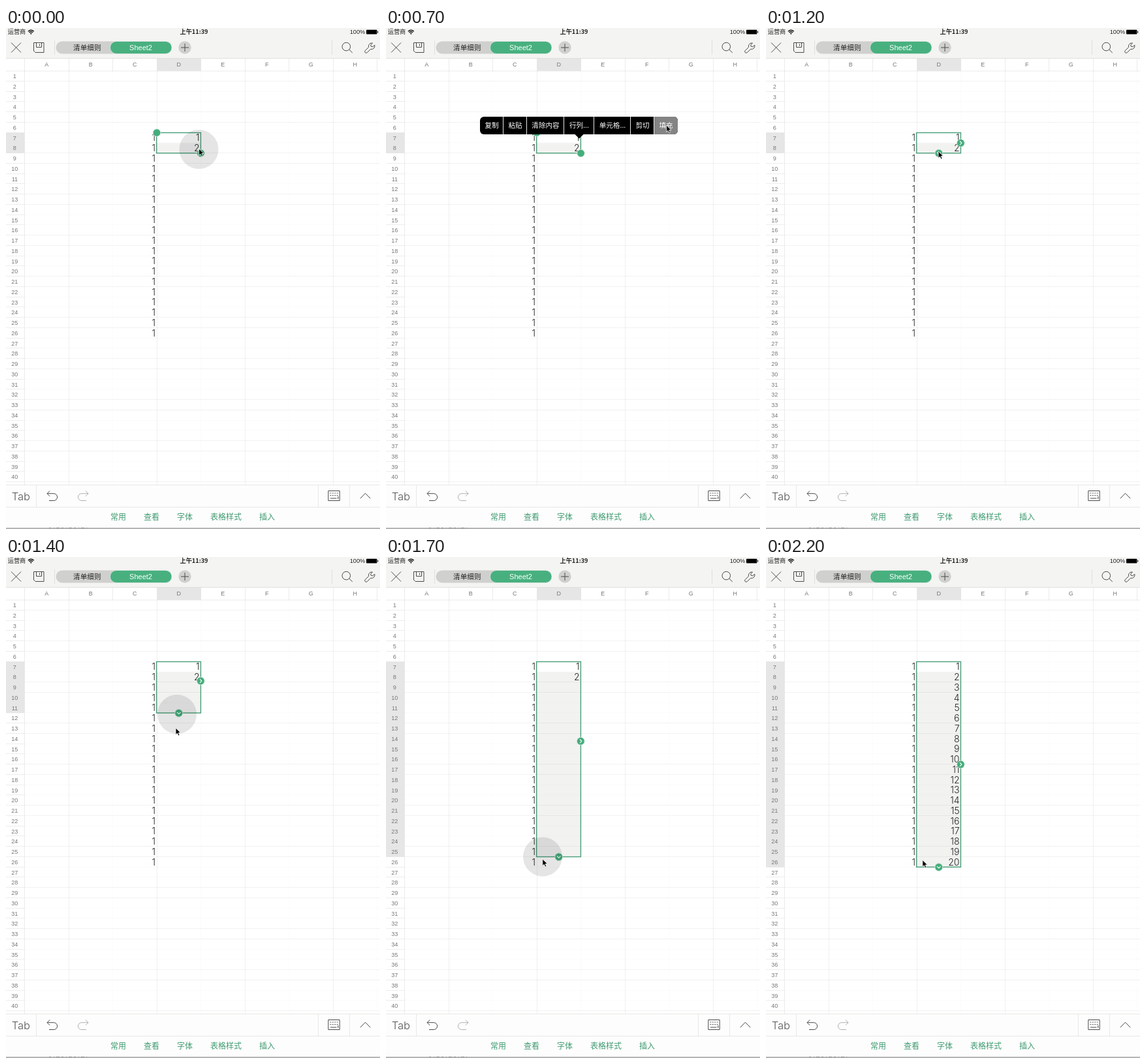
An HTML page that plays this animation: 573 by 768 pixels, repeating every 2400 ms.

```html
<!DOCTYPE html>
<html lang="zh-CN">
<head>
<meta charset="utf-8">
<title>表格填充</title>
<style>
  html, body { margin: 0; width: 100%; height: 100%; overflow: hidden; background: #fff; }
  svg { display: block; width: 573px; height: 768px; }
  text { font-family: "Noto Sans CJK SC", "Noto Sans CJK", sans-serif; text-anchor: middle; }
  .latin text, text.latin { font-family: "Liberation Sans", Arial, sans-serif; }
  .head text { font-size: 9px; fill: #777; }
  .num text { font: 300 14px Inter, Roboto, sans-serif; fill: #222; text-anchor: end; }
  .icon { fill: none; stroke: #4a4a4a; stroke-width: 1; }
  .rule { stroke: #dfdfdd; stroke-width: 1; }
  .tabs text { font-size: 12px; fill: #3f9a70; }
  .menu text { font-size: 10.6px; fill: #fff; }
  .knob { fill: #44ad7b; stroke: #dcebe3; stroke-width: .8; }
  .tip { fill: none; stroke: #fff; stroke-width: 1.1; }
</style>
</head>
<body>
<svg viewBox="0 0 573 768" xmlns="http://www.w3.org/2000/svg">
  <rect width="573" height="768" fill="#fff"/>

  <!-- sheet -->
  <rect id="fill" x="231" width="67.5" fill="#f2f2f1"/>
  <g id="grid"></g>
  <rect id="band" x="0" width="28.5" fill="#e6e6e6"/>
  <rect x="231" y="47" width="68" height="19" fill="#e6e6e6"/>
  <g id="labels" class="head latin"></g>
  <g id="ones" class="num"></g>
  <g id="series" class="num"></g>
  <rect id="frame" x="230.6" y="160.5" width="67.8" fill="none" stroke="#489e78" stroke-width="1.4"/>
  <g id="dots" class="knob">
    <circle cx="231" cy="160.5" r="5.8"/>
    <circle cx="298.5" cy="192" r="5.8"/>
  </g>
  <g id="right"><circle class="knob" r="5.9"/><path class="tip" d="M-1.3-2.8 1.5 0-1.3 2.8"/></g>
  <g id="down"><circle class="knob" r="5.9"/><path class="tip" d="M-2.8-1.3 0 1.5 2.8-1.3"/></g>

  <!-- top bar -->
  <rect width="573" height="46.5" fill="#f4f4f2"/>
  <path class="rule" d="M0 46.5H573M74.5 19V41M499.5 19V41"/>
  <g font-size="9.2" fill="#222">
    <text x="16.5" y="9.4">运营商</text>
    <text x="288" y="9.4" font-weight="700">上午11:39</text>
    <text class="latin" x="538.5" y="9.3">100%</text>
  </g>
  <g fill="none" stroke="#111" stroke-width="1.3">
    <path d="M33.8 5.2Q38.3 1.2 42.8 5.2M35.4 7Q38.3 4.4 41.2 7"/>
    <circle cx="38.3" cy="8.6" r=".5"/>
  </g>
  <path d="M553 2.8h14.4q1 0 1 1v4.6q0 1-1 1H553q-1 0-1-1V3.8q0-1 1-1zM569.2 4.8h1v2.6h-1z" fill="#000"/>
  <g class="icon">
    <path d="M8 22.5 23 37.5M23 22.5 8 37.5"/>
    <path d="M42.5 22.5H58V37.5H45L42.5 35zM46.5 22.5V29.5H54.5V22.5M51.5 24.5V27.5"/>
    <circle cx="521.3" cy="28.6" r="6.3"/>
    <path d="M525.8 33.1 530.8 38"/>
    <path d="M561.6 23.2A5 5 0 0 0 555.6 29.4L550.3 34.6A2 2 0 0 0 553.4 37.6L558.7 32.4A5 5 0 0 0 564.8 26.2L561.8 28.8 559.2 28.3 558.8 25.8z"/>
  </g>
  <rect x="76.5" y="20.5" width="177.5" height="19" rx="9.5" fill="#d0d0ce"/>
  <rect x="159.5" y="20.5" width="94.5" height="19" rx="9.5" fill="#48b07f" stroke="#f0f5f2" stroke-width=".6"/>
  <text x="124.3" y="34" font-size="10.6" fill="#222">清单细则</text>
  <text class="latin" x="206.5" y="34" font-size="11" fill="#fff">Sheet2</text>
  <circle cx="274" cy="30" r="9.7" fill="#d0d0ce"/>
  <path class="icon" d="M268 30H280M274 24V36"/>

  <!-- bottom bars -->
  <rect y="700" width="573" height="68" fill="#fdfdfd"/>
  <path class="rule" stroke-opacity=".7" d="M0 700.5H573M0 734.5H573M46.5 701V734M478.5 701V734M526.5 701V734"/>
  <text x="22.8" y="723.5" font-size="16.5" fill="#555" style="font-family:Inter,Roboto,sans-serif;font-weight:300">Tab</text>
  <g class="icon">
    <path id="undo" d="M67.2 709.5 63 713.7 67.2 717.9M63 713.7H73.2A5.4 5.4 0 0 1 73.2 724.5H66"/>
    <use href="#undo" transform="matrix(-1 0 0 1 189 0)" opacity=".42"/>
    <path d="M493.8 709.5H511.2V724.5H493.8z"/>
    <path d="M496.5 713H509M496.5 716.5H509" stroke-dasharray="1.8 1.6"/>
    <path d="M497 721H506.5M508.8 718V722"/>
    <path d="M542.8 721.2 550.5 713.2 558.2 721.2"/>
  </g>
  <g id="tabs" class="tabs"></g>
  <path d="M0 767H573" stroke="#b4b4b4" stroke-width="1.8"/>
  <path d="M66 766.3H124" stroke="#8c8c8c" stroke-width="1" stroke-dasharray="3 4 1 3 5 3"/>

  <!-- overlays -->
  <g id="menu" class="menu">
    <rect x="144" y="136" width="303" height="27" rx="6"/>
    <path d="M289 162.5H303L296 169.5z"/>
    <path id="press" d="M411 136H441a6 6 0 0 1 6 6V157a6 6 0 0 1-6 6H411z" fill="#848484"/>
  </g>
  <circle id="touch" r="30"/>
  <path id="cursor" d="M0 0V10.4L2.4 8.2 4.2 12 6 11.2 4.3 7.5H7.6z" fill="#000" stroke="#fff" stroke-width=".8"/>
</svg>
<script>
const $ = id => document.getElementById(id);
const ROW = 15.75, COL = 67.5, TOP = 66, LEFT = 28.5;
const rowY = r => TOP + (r - 1) * ROW;

function add(parent, tag, attrs, text) {
  const el = document.createElementNS("http://www.w3.org/2000/svg", tag);
  for (const k in attrs) el.setAttribute(k, attrs[k]);
  if (text !== undefined) el.textContent = text;
  return $(parent).appendChild(el);
}
const set = (id, attrs) => { for (const k in attrs) $(id).setAttribute(k, attrs[k]); };
const show = (id, on) => set(id, { visibility: on ? "visible" : "hidden" });
const move = (id, x, y) => set(id, { transform: `translate(${x} ${y})` });
const line = (d, alpha) => add("grid", "path", { d, stroke: "#000", "stroke-opacity": alpha });

line("M0 66H573", .08);
line("M28.5 47V700", .08);
for (let r = 1; r <= 40; r++) {
  const y = Math.floor(rowY(r + 1) - .5) + .5;
  if (y < 696) {
    line(`M29 ${y}H573`, r % 4 < 2 ? .05 : .015);
    line(`M0 ${y}H28`, .07);
  }
  add("labels", "text", { x: 13.3, y: rowY(r) + 11 }, r);
}
for (let c = 0; c <= 8; c++) {
  const x = Math.floor(LEFT + c * COL) + .5;
  if (c) {
    line(`M${x} 66V700`, c % 2 ? .06 : .012);
    line(`M${x} 47V66`, .08);
  }
  if (c < 8) add("labels", "text", { x: LEFT + (c + .5) * COL, y: 59.4 }, "ABCDEFGH"[c]);
}
const cells = [];
for (let n = 1; n <= 20; n++) {
  const y = rowY(n + 6) + 12.8;
  add("ones", "text", { x: 229, y }, 1);
  cells.push(add("series", "text", { x: 296.5, y }, n));
}
[["常用", 172], ["查看", 223], ["字体", 274], ["表格样式", 337], ["插入", 400]]
  .forEach(([s, x]) => add("tabs", "text", { x, y: 753.8 }, s));
[["复制", 162], ["粘贴", 198], ["清除内容", 244.5], ["行列...", 296], ["单元格...", 347], ["剪切", 393], ["填充", 429]]
  .forEach(([s, x]) => add("menu", "text", { x, y: 153.3 }, s));
[179.5, 215.5, 272.5, 318.5, 374.5, 410.5]
  .forEach(x => add("menu", "path", { d: `M${x} 136V163`, stroke: "#e8e8e8" }));

// Tracks: [tick, ...values], each held until the next entry; one tick is 100 ms.
const cursor = [
  [0, 295.5, 185], [3, 308, 182], [4, 345, 172], [5, 387, 160], [6, 420, 151], [7, 429.5, 149],
  [9, 402, 156], [10, 335, 173], [11, 278, 186], [12, 264, 189],
  [14, 260, 262], [15, 253.5, 343], [16, 245, 408], [17, 239.8, 463], [18, 239.8, 464.5]
];
const touch = [
  [0, 295.5, 186, .1], [2, 0, 0, 0], [13, 265, 192, .1], [14, 262, 241, .1], [15, 256.5, 318, .1],
  [16, 248, 392, .1], [17, 240, 459.5, .1], [18, 240, 465, .1], [20, 240, 465, .05], [21, 0, 0, 0]
];
const lastRow = [[0, 8], [14, 11], [15, 16], [16, 21], [17, 25], [18, 26]];
const rightY = [[0, 176.3], [14, 190], [15, 215.5], [16, 248], [17, 282.3], [18, 318]];
const at = (track, tick) => track.filter(k => k[0] <= tick).pop().slice(1);

function draw(tick) {
  const [last] = at(lastRow, tick), end = rowY(last + 1), filling = tick >= 8;
  set("band", { y: rowY(7), height: end - rowY(7) });
  set("fill", { y: rowY(8), height: end - rowY(8) });
  set("frame", { height: end - rowY(7) - .2 });
  show("dots", !filling);
  show("right", filling);
  show("down", filling);
  move("right", 298.3, at(rightY, tick)[0]);
  move("down", 264.7, end);
  show("menu", tick >= 2 && tick < 8);
  set("press", { "fill-opacity": tick === 7 ? 1 : 0 });
  cells.forEach((c, i) => c.setAttribute("visibility", i < 2 || tick >= 21 ? "visible" : "hidden"));
  move("cursor", ...at(cursor, tick));
  const [cx, cy, alpha] = at(touch, tick);
  set("touch", { cx, cy, "fill-opacity": alpha });
}

const start = performance.now();
let shown = -1;
function frame() {
  const tick = Math.floor((performance.now() - start) / 100) % 24;
  if (tick !== shown) draw(shown = tick);
  requestAnimationFrame(frame);
}
frame();
</script>
</body>
</html>
```
